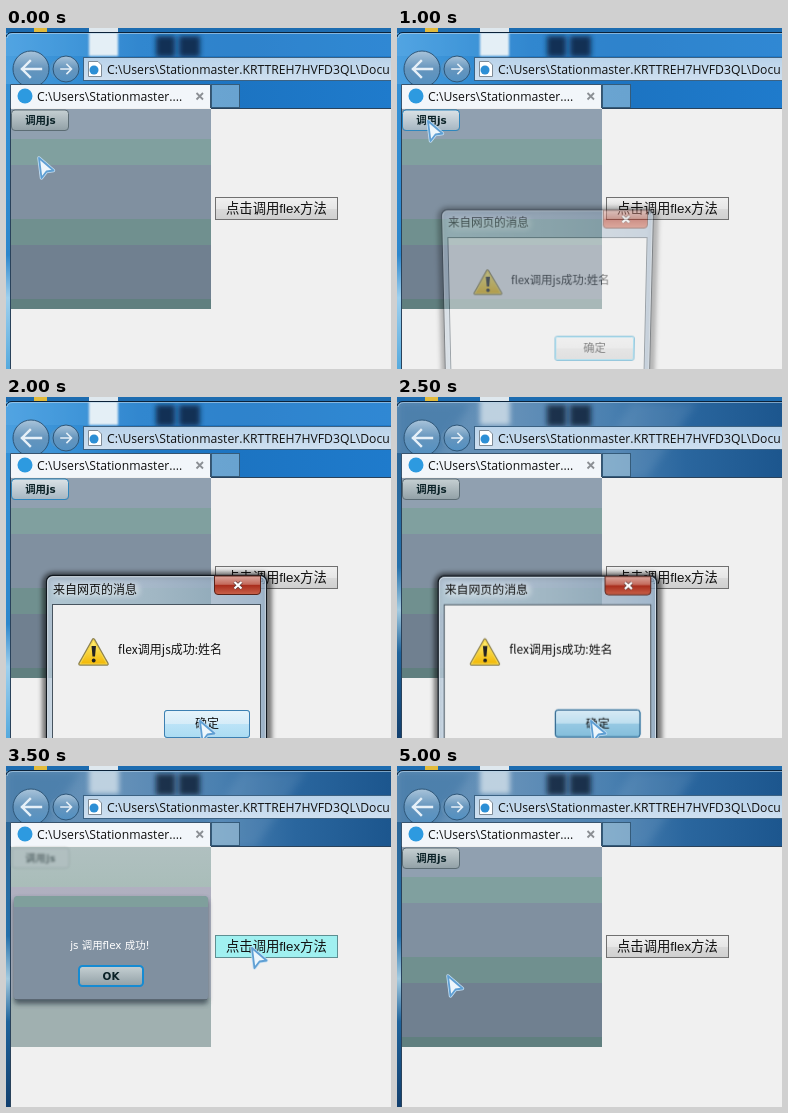
Write an HTML page that moves like this. It is 385x341 px and loops after 5500 ms.

```html
<!DOCTYPE html>
<html lang="zh">
<head>
<meta charset="utf-8">
<title>flex / js</title>
<style>
html, body { margin: 0; width: 100%; height: 100%; overflow: hidden; background: #f0f0f0; }
svg { position: absolute; left: 0; top: 0; width: 385px; height: 341px; }
text { white-space: pre; }
.ui { font: 12.2px "Open Sans", "Noto Sans", sans-serif; fill: #111; }
.cn { font: 12px "Noto Sans CJK SC", "Noto Sans CJK", sans-serif; fill: #111; }
.page { font: 13.333px "Liberation Sans", "Noto Sans CJK SC", "Noto Sans CJK", sans-serif; fill: #111; }
.flex { font: bold 10.4px "DejaVu Sans", "Noto Sans CJK SC", "Noto Sans CJK", sans-serif; fill: #0b2227; }
.alert-text { font: 10.4px "DejaVu Sans", "Noto Sans CJK SC", "Noto Sans CJK", sans-serif; fill: #fff; }

/* eleven steps of 500 ms */
.step { animation: 5.5s step-end infinite; }
#cursor { animation-name: cursor; }
#dialog { animation-name: dialog; transform-origin: 150px 245px; }
#okHot { animation-name: okHot; }
#okDown { animation-name: okDown; }
#haze { animation-name: haze; }
#jsHot { animation-name: jsHot; }
#callHot { animation-name: callHot; }
#alert { animation-name: alert; }
#alertHot { animation-name: alertHot; }
@keyframes cursor {
  0% { transform: translate(32px, 129px); }
  9.09% { transform: translate(30px, 92px); }
  27.27% { transform: translate(115px, 215px); }
  36.36% { transform: translate(193px, 323px); }
  54.54% { transform: translate(263px, 182px); }
  63.63% { transform: translate(245px, 181px); }
  72.72% { transform: translate(119px, 190px); }
  81.81% { transform: translate(109px, 208px); }
  90.9%, 100% { transform: translate(50px, 209px); }
}
@keyframes dialog {
  0% { opacity: 0; }
  18.18% { opacity: .5; transform: perspective(800px) scale(.95) rotateX(-10deg); }
  27.27% { opacity: 1; transform: none; }
  45.45% { opacity: 1; transform: scale(.993); }
  54.54%, 100% { opacity: 0; transform: none; }
}
@keyframes okHot { 0% { opacity: 0; } 36.36% { opacity: 1; } 54.54%, 100% { opacity: 0; } }
@keyframes okDown { 0% { opacity: 0; } 45.45% { opacity: 1; } 54.54%, 100% { opacity: 0; } }
@keyframes haze { 0% { opacity: 0; } 45.45%, 100% { opacity: 1; } }
@keyframes jsHot { 0% { opacity: 0; } 9.09% { opacity: 1; } 45.45%, 100% { opacity: 0; } }
@keyframes callHot { 0% { opacity: 0; } 54.54% { opacity: 1; } 72.72%, 100% { opacity: 0; } }
@keyframes alert { 0% { opacity: 0; } 63.63% { opacity: 1; } 90.9%, 100% { opacity: 0; } }
@keyframes alertHot { 0% { opacity: 0; } 81.81% { opacity: 1; } 90.9%, 100% { opacity: 0; } }
</style>
</head>
<body>
<svg viewBox="0 0 385 341" xmlns="http://www.w3.org/2000/svg">
<defs>
  <linearGradient id="glass">
    <stop offset="0" stop-color="#4a9fdf"/><stop offset=".2" stop-color="#318bd2"/>
    <stop offset=".35" stop-color="#2079c6"/><stop offset=".6" stop-color="#1c74c2"/>
    <stop offset="1" stop-color="#1f7bcc"/>
  </linearGradient>
  <linearGradient id="hazeFill">
    <stop offset="0" stop-color="#628fb6"/><stop offset=".3" stop-color="#6490b8"/>
    <stop offset=".55" stop-color="#4a80b0"/><stop offset=".75" stop-color="#2a669e"/>
    <stop offset="1" stop-color="#1c568e"/>
  </linearGradient>
  <linearGradient id="edge" x2="0" y2="1">
    <stop offset="0" stop-color="#3390d6"/><stop offset=".6" stop-color="#2c86cc"/>
    <stop offset=".75" stop-color="#9fd0ee"/><stop offset="1" stop-color="#55aade"/>
  </linearGradient>
  <linearGradient id="edgeHaze" x2="0" y2="1">
    <stop offset="0" stop-color="#2b6596"/><stop offset=".4" stop-color="#2470ab"/>
    <stop offset=".55" stop-color="#a4cbe0"/><stop offset=".7" stop-color="#1f639b"/>
    <stop offset="1" stop-color="#123f6e"/>
  </linearGradient>
  <linearGradient id="round" x2="0" y2="1">
    <stop offset="0" stop-color="#a9c4da"/><stop offset=".5" stop-color="#6595bd"/>
    <stop offset="1" stop-color="#5290c2"/>
  </linearGradient>
  <linearGradient id="field" x2="0" y2="1">
    <stop offset="0" stop-color="#b9d3ea"/><stop offset="1" stop-color="#cfe0f0"/>
  </linearGradient>
  <linearGradient id="grey" x2="0" y2="1">
    <stop offset="0" stop-color="#f0f0f0"/><stop offset=".5" stop-color="#e6e6e6"/>
    <stop offset=".5" stop-color="#dadada"/><stop offset="1" stop-color="#cfcfcf"/>
  </linearGradient>
  <linearGradient id="steel" x2="0" y2="1">
    <stop offset="0" stop-color="#c6d0d3"/><stop offset="1" stop-color="#91a0a6"/>
  </linearGradient>
  <linearGradient id="steelHot" x2="0" y2="1">
    <stop offset="0" stop-color="#dbe2e6"/><stop offset="1" stop-color="#a5b6c2"/>
  </linearGradient>
  <linearGradient id="hot" x2="0" y2="1">
    <stop offset="0" stop-color="#e6f3fa"/><stop offset=".5" stop-color="#d5ecf8"/>
    <stop offset=".5" stop-color="#bbe3f7"/><stop offset="1" stop-color="#abdcf2"/>
  </linearGradient>
  <linearGradient id="down" x2="0" y2="1">
    <stop offset="0" stop-color="#d9ebf5"/><stop offset=".5" stop-color="#bfe0f0"/>
    <stop offset=".5" stop-color="#98cae4"/><stop offset="1" stop-color="#84bfdc"/>
  </linearGradient>
  <linearGradient id="alertBlue" x2="0" y2="1">
    <stop offset="0" stop-color="#e6f1f8"/><stop offset="1" stop-color="#79bfe9"/>
  </linearGradient>
  <linearGradient id="red" x2="0" y2="1">
    <stop offset="0" stop-color="#dba69d"/><stop offset=".45" stop-color="#c46a5b"/>
    <stop offset=".5" stop-color="#a92d1c"/><stop offset="1" stop-color="#c9624b"/>
  </linearGradient>
  <linearGradient id="bar">
    <stop offset="0" stop-color="#c3d5e5"/><stop offset=".5" stop-color="#afc1d3"/>
    <stop offset=".8" stop-color="#9bb1c6"/><stop offset="1" stop-color="#8ba7c2"/>
  </linearGradient>
  <linearGradient id="sign" x2="0" y2="1">
    <stop offset="0" stop-color="#fff27a"/><stop offset="1" stop-color="#f2b705"/>
  </linearGradient>
  <linearGradient id="veil" x2="0" y2="1">
    <stop offset="0" stop-color="#b0c0c0"/><stop offset=".2" stop-color="#a9bdb9"/>
    <stop offset=".2" stop-color="#b0b0c0"/><stop offset=".75" stop-color="#a8b0bc"/>
    <stop offset=".76" stop-color="#a0b0b0"/><stop offset="1" stop-color="#a0b0b0"/>
  </linearGradient>
  <filter id="soft" x="-50%" y="-80%" width="200%" height="260%"><feGaussianBlur stdDeviation="4"/></filter>
  <filter id="blur1" x="-20%" y="-20%" width="140%" height="140%"><feGaussianBlur stdDeviation="1"/></filter>
  <filter id="shade" x="-20%" y="-20%" width="140%" height="140%"><feGaussianBlur stdDeviation="2.5"/></filter>
  <clipPath id="top"><rect y="5" width="385" height="76"/></clipPath>
</defs>

<!-- desktop and window glass -->
<rect width="385" height="341" fill="#1d6cb0"/>
<rect x="28" width="13" height="4" fill="#e2bb3c"/>
<rect x="83" width="29" height="4" fill="#dfe8ee"/>
<g clip-path="url(#top)">
  <rect width="385" height="81" fill="url(#glass)"/>
  <rect y="4" width="385" height="24" fill="#6fb6ee" opacity=".22"/>
  <rect x="83" y="0" width="29" height="28" fill="#e4eff6" filter="url(#blur1)"/>
  <g fill="#0a2440" opacity=".85" filter="url(#shade)">
    <rect x="150" y="8" width="19" height="21"/>
    <rect x="173" y="8" width="21" height="21"/>
  </g>
</g>
<rect y="56" width="5" height="285" fill="url(#edge)"/>
<g id="haze" class="step">
  <g clip-path="url(#top)">
    <rect width="385" height="81" fill="url(#hazeFill)"/>
    <path d="M0 5H75L25 81H0Z" fill="#2f6a9d" opacity=".4" filter="url(#soft)"/>
    <rect x="83" y="2" width="30" height="26" fill="#dce7ee" opacity=".75" filter="url(#shade)"/>
    <g fill="#0a1c30" opacity=".8" filter="url(#shade)">
      <rect x="150" y="8" width="19" height="21"/>
      <rect x="173" y="8" width="21" height="21"/>
    </g>
    <path d="M235 5H300L250 81H190Z" fill="#c5d8e8" opacity=".12" filter="url(#soft)"/>
  </g>
  <rect y="56" width="5" height="285" fill="url(#edgeHaze)"/>
</g>
<path d="M0 9Q1 4.500 6 4.500H385" fill="none" stroke="#0b2138"/>
<path d="M1 10Q2 5.500 7 5.500H385" fill="none" stroke="#bcd8ec" opacity=".6"/>

<!-- navigation -->
<g stroke="#2d5577">
  <rect x="44" y="31" width="30" height="20" rx="9" fill="#6f97b6" stroke="none" opacity=".4"/>
  <circle cx="25" cy="41" r="18" fill="url(#round)"/>
  <circle cx="60" cy="41" r="13" fill="url(#round)"/>
</g>
<g fill="none" stroke="#e6f0f8" stroke-linecap="square">
  <path d="M35 41H16M24 33L16 41L24 49" stroke-width="2.400"/>
  <path d="M55 41H65M61 36.500L65.500 41L61 45.500" stroke-width="1.600"/>
</g>
<rect x="77.500" y="29.500" width="320" height="23" fill="url(#field)" stroke="#3c6283"/>
<path d="M82.500 33.500H92L95.500 37V48.500H82.500Z" fill="#fff" stroke="#7f8b96"/>
<circle cx="88" cy="42" r="4.500" fill="#2d8fd5"/>
<text class="ui" x="101" y="46">C:\Users\Stationmaster.KRTTREH7HVFD3QL\Docu</text>

<!-- tabs -->
<rect x="205.500" y="56.500" width="28" height="23" fill="#a9cbdc" fill-opacity=".55" stroke="#345b7a"/>
<path d="M4.500 81V56.500H204.500V81" fill="#f2f6fa" stroke="#38546e"/>
<circle cx="19" cy="68" r="7.500" fill="#2d9ae0"/>
<text class="ui" x="31" y="73">C:\Users\Stationmaster....</text>
<path d="M190.500 65L197 71.500M197 65L190.500 71.500" stroke="#8b8f94" stroke-width="1.800"/>

<!-- page -->
<rect x="5" y="80" width="380" height="261" fill="#f0f0f0"/>
<path d="M205 80.500H385M4.500 80V341" stroke="#29425b"/>
<g shape-rendering="crispEdges">
  <rect x="5" y="81" width="200" height="200" fill="#90a0b0"/>
  <rect x="5" y="111" width="200" height="26" fill="#80a09f"/>
  <rect x="5" y="137" width="200" height="54" fill="#8090a0"/>
  <rect x="5" y="191" width="200" height="26" fill="#70908f"/>
  <rect x="5" y="217" width="200" height="54" fill="#708090"/>
  <rect x="5" y="271" width="200" height="10" fill="#607f7f"/>
</g>
<rect x="5.500" y="82" width="57" height="20.500" rx="3.500" fill="url(#steel)" stroke="#5c6c74"/>
<rect id="jsHot" class="step" x="5.500" y="82" width="57" height="20.500" rx="3.500" fill="url(#steelHot)" stroke="#2f86bd"/>
<text class="flex" x="34.500" y="96" text-anchor="middle">调用js</text>
<rect x="209.500" y="169.500" width="122" height="22" fill="url(#grey)" stroke="#707070"/>
<rect id="callHot" class="step" x="209.500" y="169.500" width="122" height="22" fill="#a0f0f0" stroke="#5e8f92"/>
<text class="page" x="220" y="185">点击调用flex方法</text>

<!-- modal box inside the panel -->
<g id="alert" class="step">
  <rect x="5" y="81" width="200" height="200" fill="url(#veil)"/>
  <g opacity=".6" filter="url(#blur1)">
    <rect x="6" y="82" width="57" height="20" rx="3" fill="#b3c0c2" stroke="#8b9b9d"/>
    <text class="flex" x="34.500" y="96" text-anchor="middle">调用js</text>
  </g>
  <rect x="8" y="133" width="194" height="105" rx="4" fill="#30404c" opacity=".75" filter="url(#shade)"/>
  <rect x="8" y="130" width="194" height="104" rx="4" fill="#8090a0"/>
  <path d="M8 141V134Q8 130 12 130H198Q202 130 202 134V141Z" fill="#7f9f9c"/>
  <path d="M9 233.500H201" stroke="#5b6772"/>
  <text class="alert-text" x="104" y="183" text-anchor="middle">js 调用flex 成功!</text>
  <rect x="73" y="200" width="64" height="20" rx="3.500" fill="url(#steel)" stroke="#168bd2" stroke-width="2"/>
  <rect id="alertHot" class="step" x="73" y="200" width="64" height="20" rx="3.500" fill="url(#alertBlue)" stroke="#168bd2" stroke-width="1.500"/>
  <text class="flex" x="105" y="213.500" text-anchor="middle">OK</text>
</g>
</svg>

<!-- message dialog -->
<svg id="dialog" class="step" viewBox="0 0 385 341" style="overflow: visible">
  <rect x="39.500" y="178.500" width="223" height="185" rx="7" fill="none" stroke="#000" stroke-width="6" opacity=".6" filter="url(#shade)"/>
  <rect x="40.500" y="178.500" width="220" height="180" rx="6" fill="url(#bar)" fill-opacity=".78" stroke="#10171e" stroke-width="1.300"/>
  <rect x="41.700" y="179.700" width="217.600" height="180" rx="5" fill="none" stroke="#eaf3fa" opacity=".75"/>
  <rect x="48" y="186" width="86" height="14" rx="6" fill="#fff" opacity=".35" filter="url(#shade)"/>
  <text class="cn" x="47" y="196.500">来自网页的消息</text>
  <path d="M208.500 179V194Q208.500 197.500 212 197.500H251Q254.500 197.500 254.500 194V179Z" fill="url(#red)" stroke="#582219"/>
  <path d="M228.500 185L235.500 191.500M235.500 185L228.500 191.500" stroke="#5d3b38" stroke-width="3.600"/>
  <path d="M228.500 185L235.500 191.500M235.500 185L228.500 191.500" stroke="#fff" stroke-width="2.200"/>
  <rect x="46.500" y="207.500" width="208" height="150" fill="#f0f0f0" stroke="#47545f"/>
  <g fill="url(#sign)" stroke-linejoin="round">
    <path d="M87.500 243L101 267H74Z" stroke="#8d8250" stroke-width="3.600"/>
    <path d="M87.500 243L101 267H74Z" stroke="#f7d647" stroke-width="1.200"/>
  </g>
  <path d="M85.500 249H90L89 259.500H86.500Z" fill="#222"/>
  <circle cx="87.700" cy="263.500" r="1.900" fill="#222"/>
  <text class="cn" x="112" y="257">flex调用js成功:姓名</text>
  <rect x="158.500" y="313.500" width="85" height="27" rx="2.500" fill="url(#grey)" stroke="#3c9fc9"/>
  <rect x="159.500" y="314.500" width="83" height="25" rx="2" fill="none" stroke="#6fd0f0"/>
  <rect id="okHot" class="step" x="158.500" y="313.500" width="85" height="27" rx="2.500" fill="url(#hot)" stroke="#3c7fb1"/>
  <rect id="okDown" class="step" x="158.500" y="313.500" width="85" height="27" rx="2.500" fill="url(#down)" stroke="#2c628b"/>
  <text class="cn" x="201" y="331" text-anchor="middle">确定</text>
</svg>

<svg viewBox="0 0 385 341">
  <g id="cursor" class="step" stroke-linejoin="round">
    <path d="M1 1L15.500 13.500L8.500 14.500L3.500 21Z" fill="#e9f3fb" stroke="#c4def2" stroke-width="3.400"/>
    <path d="M1 1L15.500 13.500L8.500 14.500L3.500 21Z" fill="#edf6fc" stroke="#5f9fd3" stroke-width="1.800"/>
  </g>
</svg>
</body>
</html>
```
